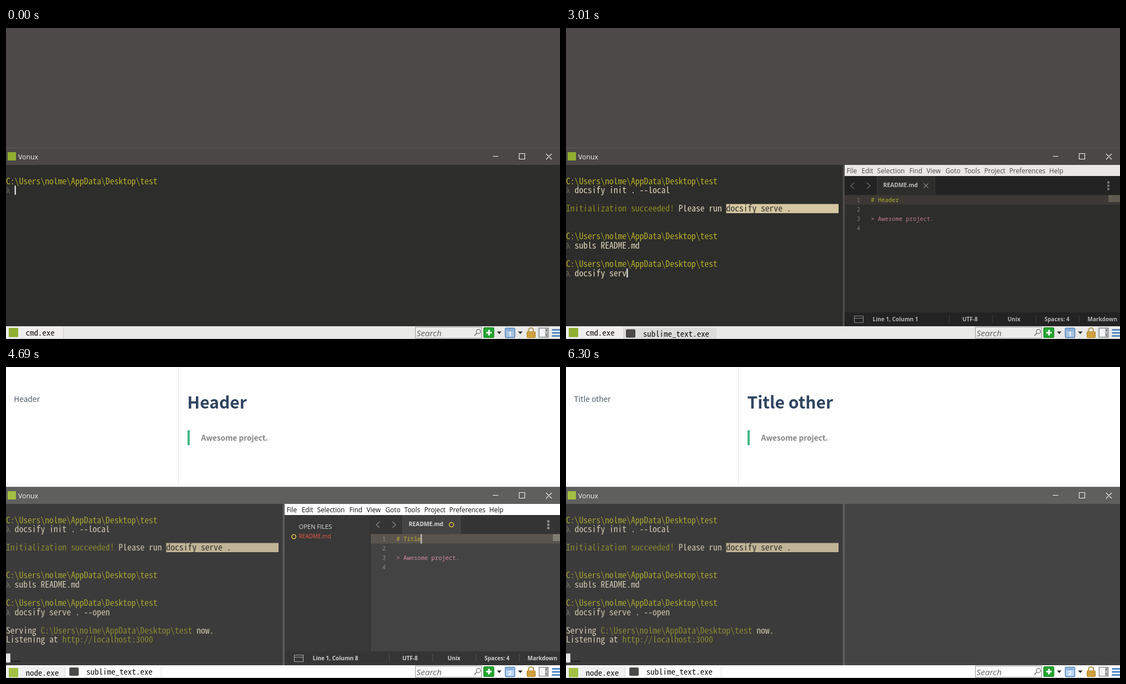
Animation, 998 px wide and 561 px high, one loop 6330 ms. Source, as an HTML page:

```html
<!DOCTYPE html>
<html lang="en">
<head>
<meta charset="utf-8">
<title>Terminal and live preview</title>
<style>
html, body { margin: 0; width: 100%; height: 100%; overflow: hidden; background: #4d4948; }
svg { display: block; width: 998px; height: 561px; }
text { white-space: pre; }
.ui { font-family: "Open Sans", "Noto Sans", sans-serif; }
.page { font-family: "Noto Sans CJK SC", "Noto Sans CJK JP", "Noto Sans", sans-serif; }
.mono { font-family: "Noto Sans Mono CJK SC", "Noto Sans Mono CJK JP", "Noto Sans Mono", monospace; font-variant-ligatures: none; }
.code { font-family: "Noto Sans Mono", "DejaVu Sans Mono", monospace; }
</style>
</head>
<body>
<svg id="stage" viewBox="0 0 998 561" xmlns="http://www.w3.org/2000/svg"></svg>
<script>
const LOOP = 6330, STEP = 70;
const CELL = 7.8, ROW = 16.6, TOP = 267.5;
const CODE = 6.3, LINE = 17.1;
const USER_PATH = 'C:\\Users\\nolme\\AppData\\Desktop\\test';

const DIM = {
  title: '#4b4746', edge: '#5b5755', term: '#2d2d2b', pane: '#2d2d2b', divider: '#4c4b49',
  path: '#b5ae2a', cmd: '#e0d6bb', lambda: '#7a7263', olive: '#8a8a20', mark: '#d5c7a1',
  bar: '#e9e9e7', tab: '#efeeec', idle: '#dcdcda', menu: '#e9e8e7', menuText: '#4c4c4c',
  strip: '#232323', row: '#3d3835', heading: '#b4ad2a', quote: '#bd7c8b', faint: '#817c74',
  map: '#5e5c50', green: '#8fae31'
};
const LIT = {
  title: '#5f5f5e', edge: '#747473', term: '#3b3b3b', pane: '#434343', divider: '#5c5c5c',
  path: '#a5a432', cmd: '#d0c7ae', lambda: '#827d73', olive: '#878932', mark: '#c1b496',
  bar: '#ffffff', tab: '#ffffff', idle: '#f0f0f0', menu: '#ffffff', menuText: '#111111',
  strip: '#353535', row: '#5a544e', heading: '#b8b332', quote: '#d58c9f', faint: '#938f87',
  map: '#7d7b72', green: '#a2bf43'
};

// Font size whose character advance equals the given cell width.
const pen = document.createElement('canvas').getContext('2d');
pen.font = '100px "Noto Sans Mono CJK SC", "Noto Sans Mono CJK JP", "Noto Sans Mono", monospace';
const advance = pen.measureText('M').width / 100;
const monoSize = cell => cell / advance;

const escape = s => s.replace(/&/g, '&amp;').replace(/</g, '&lt;').replace(/>/g, '&gt;');
const rect = (x, y, w, h, fill, extra = '') =>
  `<rect x="${x}" y="${y}" width="${w}" height="${h}" fill="${fill}" ${extra}/>`;
const path = (d, stroke, width = 1, fill = 'none') =>
  `<path d="${d}" stroke="${stroke}" stroke-width="${width}" fill="${fill}"/>`;
const text = (x, y, s, kind, size, fill, extra = '') =>
  `<text x="${x}" y="${y}" class="${kind}" font-size="${size}" fill="${fill}" ${extra}>${escape(s)}</text>`;

const ramp = (t, start, steps, total) => {
  const k = Math.max(0, Math.min(steps, Math.floor((t - start) / STEP) + 1));
  return Math.round(total * k / steps);
};
const latest = (t, keys) => keys.filter(k => k[0] <= t).pop()[1];
const within = (t, a, b) => t >= a && t < b;

function page(t) {
  let out = rect(0, 0, 998, 217, '#fefefe');
  if (within(t, 4970, 5040) || within(t, 5950, 6020)) return out;
  const title = latest(t, [[0, 'Header'], [5040, 'Title'], [6020, 'Title other']]);
  out += rect(310, 0, 1, 217, '#e8e8e8');
  out += text(14.3, 62.5, title, 'page', 13.7, '#505d6b');
  out += text(326.5, 74.5, title, 'page', 30, '#2f4460', 'font-weight="600"');
  out += rect(327, 114, 4, 27, '#42b983');
  out += text(351.5, 133.3, 'Awesome project.', 'page', 13.7, '#858585', 'font-weight="600"');
  return out;
}

function titleBar(c) {
  return rect(0, 216, 998, 31, c.title) + rect(0, 216, 998, 1, c.edge)
    + rect(3, 224, 15, 15, c.green)
    + text(22, 237, 'Vonux', 'ui', 12.3, '#f4f4f4')
    + path('M877 231.5h10M924.5 226.5h10v10h-10zM973 227l10 10M983 227l-10 10', '#f4f4f4', 1.1);
}

function terminal(t, c, split) {
  const size = monoSize(CELL);
  const put = (row, col, s, color) =>
    text(col * CELL, TOP + row * ROW + 14, s, 'mono', size, color);
  const prompt = (row, typed) => put(row, 0, USER_PATH, c.path)
    + text(0, TOP + (row + 1) * ROW + 14, 'λ', 'code', 12.6, c.lambda)
    + put(row + 1, 2, typed, c.cmd);

  const n1 = ramp(t, 70, 10, 14) + ramp(t, 770, 5, 8);
  const n2 = ramp(t, 1400, 1, 3) + ramp(t, 1540, 3, 3) + ramp(t, 1960, 7, 9);
  const n3 = ramp(t, 2660, 6, 12) + ramp(t, 3080, 2, 2) + ramp(t, 3220, 1, 1)
    + ramp(t, 3430, 1, 1) + ramp(t, 3570, 4, 6);

  let out = rect(0, 247, 998, 291, c.term);
  let cursor = [1, 2 + n1];
  out += prompt(0, 'docsify init . --local'.slice(0, n1));
  if (t >= 1190) cursor = [2, 0];
  if (t >= 1330) {
    out += put(3, 0, 'Initialization succeeded!', c.olive) + put(3, 26, 'Please run', c.cmd);
    out += rect(37 * CELL, 317.5, (split ? 491 : 405.6) - 37 * CELL, 16.5, c.mark);
    out += put(3, 37, 'docsify serve .', '#30302d');
    out += prompt(6, 'subls README.md'.slice(0, n2));
    cursor = [7, 2 + n2];
  }
  if (t >= 2520) {
    out += prompt(9, 'docsify serve . --open'.slice(0, n3));
    cursor = [10, 2 + n3];
  }
  if (t >= 3850) cursor = [11, 0];
  if (t >= 3920) {
    out += put(12, 0, 'Serving', c.cmd) + put(12, 8, USER_PATH, c.olive) + put(12, 44, 'now.', c.cmd);
    cursor = [13, 0];
  }
  if (t >= 3990) {
    out += put(13, 0, 'Listening at', c.cmd) + put(13, 13, 'http://localhost:3000', c.olive);
    cursor = [15, 0];
  }
  const focused = t < 4060;
  if (!within(t, 1820, 1960) && !within(t, 3360, 3430))
    out += rect(cursor[1] * CELL, TOP + cursor[0] * ROW + .3, focused ? 2.1 : 7.8, 16.3, focused ? '#f4f4f2' : '#e4e4e2');
  if (!focused) out += rect(9, 530, 17, 1.5, '#191919');
  return out;
}

function editor(t, c, lit) {
  const dirty = within(t, 4550, 4900) || within(t, 5390, 5880);
  const side = !lit ? 0 : dirty ? 154 : 129.4;
  const base = 549.3 + side;
  const source = latest(t, [[0, '# Header'], [4550, '# T'], [4620, '# Tit'], [4690, '# Title'],
    [5390, '# Title '], [5460, '# Title o'], [5530, '# Title ot'], [5600, '# Title oth'],
    [5670, '# Title othe'], [5740, '# Title other']]);
  const col = t < 4270 ? 0 : t < 4340 ? 2 : source.length;
  const mapX = lit ? (dirty ? 985 : 984) : 977;
  let out = '';

  // Menu
  out += rect(502, 247, 496, 20, c.menu);
  const menus = { File: 506, Edit: 533, Selection: 561, Find: 619, View: 650, Goto: 684,
    Tools: 718, Project: 754, Preferences: 799, Help: 871 };
  for (const name in menus) out += text(menus[name] - .5, 262, name, 'ui', 11.8, c.menuText);

  // Tab strip
  out += rect(502, 267, 496, 34, c.strip);
  out += rect(560.5 + side, 267, 104, 34, c.pane);
  out += path(`M${560.5 + side} 267v34M${664.5 + side} 267v34`, lit ? '#505050' : '#3b3b3b');
  out += path(`M${519 + side} 279l-6 5.5l6 5.5M${542 + side} 279l6 5.5l-6 5.5`, lit ? '#858585' : '#6a6a6a', 1.3);
  out += text(571.5 + side, 287.3, 'README.md', 'ui', 10.3, lit ? '#d6d6d6' : '#bcbcbc', 'font-weight="700"');
  out += dirty
    ? `<circle cx="${648.5 + side}" cy="284.5" r="4" fill="none" stroke="#e9b94a" stroke-width="1.6"/>`
    : path(`M${644.5 + side} 280.5l8 8M${652.5 + side} 280.5l-8 8`, '#85827c', 1.2);
  for (const y of [278.5, 284.5, 290.5]) out += `<circle cx="977" cy="${y}" r="2.2" fill="${lit ? '#929292' : '#777'}"/>`;

  // Sidebar
  if (lit) {
    const x = dirty ? 527.5 : 503;
    out += rect(502, 267, side + .5, 246, '#383838') + rect(502 + side, 267, 1, 246, '#2f2f2f');
    out += text(x, 292, 'OPEN FILES', 'ui', 11.1, '#dedede');
    out += text(x, 309, 'README.md', 'ui', 10, '#f05a43');
    if (dirty) out += '<circle cx="518.5" cy="306" r="3.7" fill="none" stroke="#e9b94a" stroke-width="1.6"/>';
  }

  // Code
  out += rect(503 + side, 301.5, 495 - side, 17, c.row);
  out += rect(mapX, 301.5, 998 - mapX, 12.5, c.map);
  out += rect(mapX + 2, 303, 4, 1, c.faint);
  if (within(t, 4410, 4550)) out += rect(base + 2 * CODE, 301.5, 6 * CODE, 17, '#7a7166');
  for (let i = 0; i < 4; i++)
    out += text(530 + side, 313.7 + i * LINE, String(i + 1), 'code', 10, c.faint, 'text-anchor="end"');
  out += text(base, 313.7, source, 'code', 10.5, c.heading);
  out += text(base, 313.7 + 2 * LINE, '> Awesome project.', 'code', 10.5, c.quote);
  if (source.endsWith(' ')) out += rect(base + (source.length - 1) * CODE, 301.5, 6.5, 17, '#ff5d43');
  if (lit) out += rect(base + col * CODE - .7, 301.5, 2.6, 17, '#b9b5ae');

  // Status
  out += rect(502, 513, 496, 25, c.strip);
  out += path('M519.5 519.5h16v12h-16zM519.5 523.5h16', lit ? '#a5a5a5' : '#858585', 1.2);
  const status = (x, s) => text(x, 528.7, s, 'ui', 10, lit ? '#cfcfcf' : '#b5b5b5', 'font-weight="700"');
  out += status(552.5, `Line 1, Column ${col + 1}`) + status(714, 'UTF-8') + status(795.5, 'Unix')
    + status(862, 'Spaces: 4') + status(939.5, 'Markdown');
  out += path('M690.5 518v14M768.5 518v14M846.5 518v14M924.5 518v14', lit ? '#505050' : '#3d3d3d');
  return out;
}

function taskBar(t, c, lit, split) {
  const size = monoSize(7.46);
  const node = within(t, 1190, 1330) || t >= 3850;
  const edge = lit ? 106 : node ? 109 : 103;
  let out = rect(0, 538, 998, 23, c.bar);
  out += rect(0, lit ? 541 : 538, edge, lit ? 18.5 : 22, lit ? c.idle : c.tab);
  out += rect(edge, 540, 1, 20, '#d2d2d0');
  out += rect(5, lit ? 543 : 541, 17, 16.5, c.green);
  out += text(35.5, lit ? 556.5 : 554.7, node ? 'node.exe' : 'cmd.exe', 'mono', size, '#151515');
  if (split) {
    const x = lit ? 110 : edge + 1;
    out += lit ? rect(107, 538, 173, 22, '#fff') + rect(279, 540, 1, 20, '#dedede')
      : rect(x, 541, 167, 19, c.idle);
    out += rect(x + 4, lit ? 542 : 543.5, 17, 15, '#4b4a49', 'rx="2"');
    out += text(x + 34.8, lit ? 554.7 : 556.5, 'sublime_text.exe', 'mono', size, '#151515');
  }
  out += rect(0, 560, 998, 1, '#c5c5c3');

  // Search field
  out += rect(737.5, 539.5, 119, 20, lit ? '#fff' : '#ececea', 'stroke="#979797"');
  out += text(739.5, 555.5, 'Search', 'ui', 15.3, '#606060', 'font-style="italic"');
  out += '<circle cx="851" cy="547.5" r="3.8" fill="none" stroke="#666" stroke-width="1.2"/>';
  out += path('M848 550.5l-4 4.5', '#666', 1.6);

  // Tool buttons
  out += rect(860.5, 540.5, 18.5, 18, '#23a52f', 'rx="1.5" stroke="#14821f"');
  out += path('M870 544.5v10M865 549.5h10', '#fff', 3.2);
  out += path('M884.5 547.5h8l-4 4.5zM922.5 547.5h8l-4 4.5z', 'none', 0, '#222');
  out += rect(899.5, 541.5, 17, 17, lit ? '#b7d4f1' : '#a9c4df', 'rx="1.5" stroke="#4b7db5" stroke-width="1.5"');
  out += rect(901.5, 543.5, 13, 3, '#82abd7');
  out += text(908, 555.5, lit ? '2' : '1', 'ui', 11, '#fff', 'text-anchor="middle" font-weight="700"');
  out += path('M941.5 549v-4a4.3 4 0 0 1 8.6 0v4', '#b39a58', 2.2);
  out += rect(938.5, 548, 15, 10.5, '#d9a941', 'rx="1" stroke="#a77b26"');
  out += path('M939 551.5h14M939 555h14', '#b98a31');
  out += rect(958, 539.5, 20.5, 20, lit ? '#ededed' : '#c8cfd6');
  out += rect(960.5, 541.5, 16, 16, '#f5f5f5', 'stroke="#7b7b7b"');
  out += rect(971, 542, 5, 15, '#b7b7b7') + path('M973.5 544v3M973.5 552v3', '#555', 1.5);
  out += path('M983.5 544.5h15M983.5 550h15M983.5 555.5h15', '#3877bd', 2.5);
  return out;
}

function draw(t) {
  const lit = t >= 4060, split = t >= 2590;
  const c = lit ? LIT : DIM;
  let out = lit ? page(t) : rect(0, 0, 998, 217, '#4d4948');
  out += titleBar(c) + terminal(t, c, split);
  if (split) {
    out += rect(502, 247, 496, 291, c.pane) + rect(498.5, 247, 4, 291, c.divider);
    if (within(t, 2660, 6300)) out += editor(t, c, lit);
  }
  return out + taskBar(t, c, lit, split);
}

const stage = document.getElementById('stage');
const begin = performance.now();
let shown = -1;
function tick() {
  const t = (performance.now() - begin) % LOOP;
  const step = Math.floor(t / STEP);
  if (step !== shown) {
    shown = step;
    stage.innerHTML = draw(step * STEP);
  }
  requestAnimationFrame(tick);
}
tick();
</script>
</body>
</html>
```
